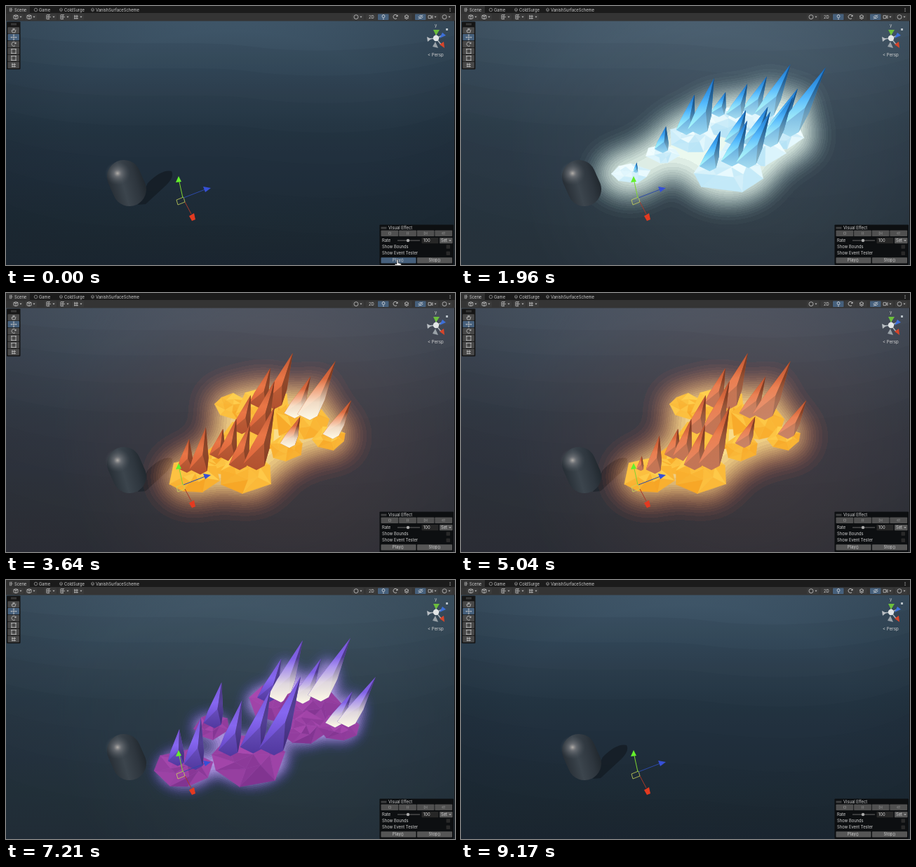
An HTML page that plays this animation: 640x370 px, repeating every 9310 ms.

```html
<!DOCTYPE html>
<html lang="en">
<head>
<meta charset="utf-8">
<title>Crystal eruption</title>
<style>
html, body { margin: 0; width: 100%; height: 100%; overflow: hidden; background: #25323d; }
svg { display: block; width: 640px; height: 370px; }
text { font: 5.8px Inter, "Open Sans", sans-serif; fill: #d2d2d2; }
</style>
</head>
<body>
<svg id="stage" viewBox="0 0 640 370">
  <defs>
    <linearGradient id="ground" x2="0" y2="1">
      <stop offset="0" stop-color="#40576a"/><stop offset=".18" stop-color="#364b5c"/>
      <stop offset=".42" stop-color="#2b3c4a"/><stop offset=".7" stop-color="#25333e"/>
      <stop offset="1" stop-color="#222d36"/>
    </linearGradient>
    <radialGradient id="vignette" cx=".5" cy=".4" r=".65">
      <stop offset=".55" stop-color="#18232d" stop-opacity="0"/><stop offset="1" stop-color="#18232d" stop-opacity=".3"/>
    </radialGradient>
    <radialGradient id="fade" gradientUnits="userSpaceOnUse" cx="400" cy="185" r="330">
      <stop offset=".2" stop-color="#fff"/><stop offset="1" stop-color="#777"/>
    </radialGradient>
    <mask id="wash"><rect width="640" height="370" fill="url(#fade)"/></mask>
    <linearGradient id="body" gradientUnits="userSpaceOnUse" x1="147" y1="262" x2="198" y2="248">
      <stop offset="0" stop-color="#262d34"/><stop offset=".4" stop-color="#3c454d"/>
      <stop offset=".75" stop-color="#2e363e"/><stop offset="1" stop-color="#20272d"/>
    </linearGradient>
    <radialGradient id="shine">
      <stop offset="0" stop-color="#c0bab4" stop-opacity=".9"/><stop offset=".3" stop-color="#85868a" stop-opacity=".6"/>
      <stop offset="1" stop-color="#50585f" stop-opacity="0"/>
    </radialGradient>
    <linearGradient id="heat" x2="0" y2="1">
      <stop offset=".3" stop-color="#fffbe8" stop-opacity="0"/><stop offset=".7" stop-color="#fffbe8" stop-opacity=".8"/>
      <stop offset="1" stop-color="#fffbe8"/>
    </linearGradient>
  </defs>

  <rect y="21" width="640" height="349" fill="url(#ground)"/>
  <g id="waves" fill="#17232d" fill-opacity=".07"/>
  <rect y="21" width="640" height="349" fill="url(#vignette)"/>
  <rect id="tint" y="21" width="640" height="349" mask="url(#wash)"/>
  <path id="shadow" d="M188 284L202 253Q222 233 236 236Q241 245 225 259L199 283Z" fill="#141d25"/>
  <g id="glows"></g>
  <path d="M168 244L176 262" stroke="url(#body)" stroke-width="48" stroke-linecap="round"/>
  <ellipse cx="159" cy="239" rx="18" ry="17" fill="url(#shine)"/>
  <g id="crystals"></g>

  <g id="handles" fill="none">
    <path d="M243 277L253 273L255 280L245 284Z" stroke="#c9d65c" stroke-width=".8"/>
    <path d="M252 274L247 251" stroke="#7ed531"/><path d="M242 252L246 243L250 251Z" fill="#64f02c"/>
    <path d="M255 280L264 297" stroke="#a8392a"/><path d="M261 300L268 296L270 305L265 307Z" fill="#e33a20"/>
    <path d="M253 274L284 262" stroke="#2c49a8"/><path d="M281 258L292 260L284 266Z" fill="#3650d6"/>
  </g>

  <g id="compass">
    <path d="M613 46L603 47M613 46L622 42M613 46L620 55M613 46L613 36" stroke="#aab2b8" stroke-width="1.5"/>
    <path d="M609 34L618 34L613 42Z" fill="#6cbf3c"/><path d="M622 38L627 42L618 46Z" fill="#3d6fd8"/>
    <path d="M618 55L624 51L625 60Z" fill="#d6452a"/><path d="M600 44L606 47L601 51Z" fill="#b9bec3"/>
    <path d="M608 58L612 51L616 60Z" fill="#9aa2a8"/>
    <circle cx="613" cy="46" r="4.2" fill="#e2e5e6"/>
    <path d="M627 32h3v3h-3z" fill="#b7c0c7"/>
    <text x="611" y="30">y</text>
    <text x="601" y="72" style="font-size:6.2px">&lt; Persp</text>
  </g>
  <g id="ui"></g>
  <g id="panel"></g>
  <path id="cursor" d="M-1 0Q0 -2 1 0V4L5 5Q6 8 4 11H-1L-4 6L-2 5L-1 6Z" fill="#fff" stroke="#111" stroke-width=".6"/>
</svg>
<script>
const $ = id => document.getElementById(id);
const LOOP = 9310, STEP = 70;

function add(parent, tag, attrs = {}, label) {
  const node = document.createElementNS('http://www.w3.org/2000/svg', tag);
  for (const key in attrs) node.setAttribute(key, attrs[key]);
  if (label) node.textContent = label;
  return parent.appendChild(node);
}
const clamp = v => Math.max(0, Math.min(1, v));
const ramp = (t, a, b) => clamp((t - a) / (b - a));
const lerp = (a, b, k) => a + (b - a) * k;
const mix = (p, q, k) => p.map((v, i) => lerp(v, q[i], k));
const rgb = c => `rgb(${c.map(v => Math.min(255, Math.round(v)))})`;
const poly = points => 'M' + points.map(p => p.map(v => v.toFixed(1))).join('L') + 'Z';
const easeOutBack = k => 1 + 2.2 * (k - 1) ** 3 + 1.2 * (k - 1) ** 2;

let seed = 7;
const random = () => (seed = seed * 16807 % 2147483647) / 2147483647;
const jitter = amount => (random() - .5) * amount;

// Each cluster is x, y, rock radius, spike height; everything else follows from rules.
const effects = [
  { start: 0, blur: 17, spread: 20, flat: .58, shade: 0, tint: '#7a8690', tintAlpha: .26,
    rock: [[240, 253, 255], [180, 226, 246]], spike: [[20, 92, 165], [62, 152, 220], [130, 212, 252]],
    peak: [.9, .97, .91], gamma: [1.3, 1.2, 1.2],
    clusters: [[422, 158, 34, 72], [378, 165, 38, 45], [455, 187, 34, 92], [330, 188, 34, 75], [412, 203, 46, 66],
      [287, 212, 22, 36], [381, 236, 50, 75], [241, 239, 30, 50]] },
  { start: 3080, blur: 20, spread: 12, flat: .76, shade: .65, tint: '#7a5450', tintAlpha: .36,
    rock: [[255, 207, 78], [246, 160, 32]], spike: [[156, 70, 42], [194, 98, 58], [184, 84, 48]],
    peak: [.97, .82, .38], gamma: [1, 1.5, 1.7],
    clusters: [[322, 163, 23, 0], [368, 166, 40, 74], [420, 184, 36, 78], [345, 205, 38, 72], [461, 207, 22, 50],
      [400, 222, 26, 40], [308, 238, 30, 55], [343, 256, 38, 85], [267, 262, 34, 62]] },
  { start: 6440, blur: 11, spread: 4, flat: .68, shade: 0, tint: '#4a5a62', tintAlpha: .3,
    rock: [[168, 72, 174], [126, 50, 142]], spike: [[98, 72, 176], [112, 86, 200], [84, 58, 164]],
    peak: [.72, .54, .93], gamma: [1.9, 2.1, 1.4],
    clusters: [[380, 175, 38, 82], [434, 178, 42, 84], [292, 210, 26, 60], [425, 212, 35, 0], [476, 212, 28, 66],
      [348, 256, 54, 105], [255, 270, 40, 68]] }
];
const lights = [[418, 206, 58], [346, 174, 46], [323, 234, 44]];

function makeRock(parent, rx, ry, [light, dark]) {
  const count = 7, turn = random() * 6;
  const ring = (radius, dy) => Array.from({ length: count }, (_, i) => {
    const a = turn + (i + random() * .5) / count * Math.PI * 2, r = radius * (.9 + random() * .25);
    return [Math.cos(a) * rx * r, Math.sin(a) * ry * r + dy];
  });
  const outer = ring(1, 0), inner = ring(.5, -ry * .15), center = [rx * .08, -ry * .2];
  const facet = (...points) => {
    const y = points.reduce((sum, p) => sum + p[1], 0) / 3;
    const color = rgb(mix(light, dark, clamp(.4 + y / ry * .35 + jitter(.7))));
    add(parent, 'path', { d: poly(points), fill: color, stroke: color, 'stroke-width': .5 });
  };
  outer.forEach((p, i) => {
    const j = (i + 1) % count;
    facet(p, outer[j], inner[i]);
    facet(inner[i], inner[j], outer[j]);
    facet(inner[i], inner[j], center);
  });
}

function makeSpike(parent, tip, w, name) {
  const left = [-w / 2, -w * .08], right = [w / 2, w * .02], foot = [w * .12, w * .22];
  const bulge = (p, dx) => { const q = mix(p, tip, .3); return [q[0] + dx, q[1]]; };
  const l = bulge(left, -w * .06), r = bulge(right, w * .1), ridge = mix(foot, tip, .42);
  const shape = (points, fill) => add(parent, 'path', { d: poly(points), fill });
  shape([left, l, tip, r, right, foot], `url(#${name}1)`);
  shape([left, l, tip, ridge], `url(#${name}0)`);
  shape([ridge, tip, r, right], `url(#${name}2)`);
  return shape([left, l, tip, r, right, foot], 'url(#heat)');
}

function makePaint(fx, n) {
  const defs = document.querySelector('defs');
  const filter = add(defs, 'filter', { id: 'bloom' + n, filterUnits: 'userSpaceOnUse', x: 0, y: 21, width: 640, height: 349,
    'color-interpolation-filters': 'sRGB' });
  fx.blurNode = add(filter, 'feGaussianBlur', { stdDeviation: fx.blur });
  add(filter, 'feColorMatrix', { values: '0 0 0 1 0  0 0 0 1 0  0 0 0 1 0  0 0 0 0 1' });
  const transfer = add(filter, 'feComponentTransfer'), levels = 20;
  [...'RGB'].forEach((channel, c) => {
    const values = Array.from({ length: levels }, (_, i) => (fx.peak[c] * (i / (levels - 1)) ** fx.gamma[c]).toFixed(3));
    add(transfer, 'feFunc' + channel, { type: 'discrete', tableValues: values.join(' ') });
  });
  [1.2, .97, .74].forEach((gain, i) => {
    const gradient = add(defs, 'linearGradient', { id: `spike${n}-${i}`, x2: 0, y2: 1 });
    fx.spike.forEach((c, s) => add(gradient, 'stop', { offset: s / 2, 'stop-color': rgb(c.map(v => v * gain)) }));
  });
}

function buildEffect(fx, n) {
  makePaint(fx, n);
  fx.glowNode = add($('glows'), 'g', { filter: `url(#bloom${n})`, style: 'mix-blend-mode:screen' });
  fx.node = add($('crystals'), 'g');
  fx.parts = [];
  const spot = (cx, cy, rx, ry) => add(fx.glowNode, 'ellipse', { cx, cy, rx, ry });
  fx.lamps = lights.flatMap(([x, y, size]) => [[1, .9], [1.7, .25]].map(([grow, power]) =>
    ({ node: spot(x, y, size * grow, size * grow * .52), power: power * (size / 58) ** 1.7 })));

  fx.clusters.sort((a, b) => a[1] - b[1]).forEach(([x, y, radius, height]) => {
    const ry = radius * fx.flat, rock = add(fx.node, 'g');
    makeRock(rock, radius, ry, fx.rock);
    fx.parts.push({ node: rock, x, y, lag: 150, halo: spot(x, y, radius + fx.spread, ry + fx.spread) });
    const count = height ? Math.round(radius / 18) : 0;
    for (let i = 0; i < count; i++) {
      const side = i - (count - 1) / 2;
      const bx = x + side * radius * .55 + jitter(5), by = y - ry * .3 + jitter(8);
      const h = height * (i < count - 1 ? .7 + i * .1 : 1);
      const lean = h * (.1 + (bx - 240) / 460), width = 13 + h * .2, hot = bx > 385;
      const node = add(fx.node, 'g'), heat = makeSpike(node, [lean, -h], width, `spike${n}-`);
      const halo = hot && spot(bx + lean * .3, by - h * .3, width * .6, h * .4);
      fx.parts.push({ node, x: bx, y: by, lag: 0, heat, hot, halo });
    }
  });
}

function drawEffect(fx, t) {
  const u = t - fx.start, active = u > 0 && u < 2800;
  fx.node.style.display = fx.glowNode.style.display = active ? '' : 'none';
  if (!active) return 0;
  fx.blurNode.setAttribute('stdDeviation', lerp(fx.blur, 20, ramp(u, 1500, 2300)));
  fx.parts.forEach(part => {
    const born = 60 + (part.x - 230) * 1.3 + (part.lag ? 0 : 20);
    const dying = 1960 + (part.x - 300) * (part.x < 300 ? 4 : 1.2) + part.lag;
    const growth = ramp(u, born, born + 130), decay = ramp(u, dying, dying + 240);
    const scale = growth ? easeOutBack(growth) * (1 - decay * decay) : 0;
    part.node.setAttribute('transform', `translate(${part.x} ${part.y}) scale(${Math.max(0, scale)})`);
    if (part.heat) {
      const early = part.hot ? 1 - .7 * ramp(u, 800, 1300) : .5 * (1 - ramp(u, born, born + 200));
      part.heat.setAttribute('opacity', Math.max(early, ramp(u, 1700, 2300) * .5));
    }
    if (part.halo) part.halo.setAttribute('opacity', growth * (1 - ramp(u, 2150, 2560)) * .95);
  });
  const lamp = ramp(u, 1900, 2350) * (1 - ramp(u, 2570, 2720));
  fx.lamps.forEach(({ node, power }) => node.setAttribute('opacity', lamp * power));
  return ramp(u, 60, 400) * (1 - ramp(u, 2050, 2500));
}

for (let i = 0; i < 7; i++) {
  const y = 52 + i * 34 + i * i * 1.5, dip = 10 + i * 3;
  add($('waves'), 'path', { d: `M0 ${y - dip}C140 ${y + dip} 260 ${y - 6} 350 ${y + 6}S560 ${y + dip} 640 ${y - dip}V370H0Z` });
}

const box = (parent, x, y, width, height, fill) => add(parent, 'rect', { x, y, width, height, fill, rx: .8 });
const say = (parent, x, y, label, more) => add(parent, 'text', { x, y, ...more }, label);
const icon = (parent, x, y, d, more) => add(parent, 'path', { d, transform: `translate(${x} ${y})`, fill: 'none',
  stroke: '#c4c4c4', 'stroke-width': .8, ...more });
const arrow = (parent, x, y) => icon(parent, x, y, 'M-1.6 -.8H1.6L0 1.2Z', { fill: '#bbb', stroke: 'none' });

const glyph = {
  cube: 'M-3 -2L0 -3L3 -2V2L0 3L-3 2ZM-3 -2L0 -1L3 -2M0 -1V3',
  grid: 'M-3 -3H2M-3 0H3M-3 3H1M-3 -3V3M0 -3V3',
  disc: 'M-3 0A3 3 0 1 1 3 0A3 3 0 1 1 -3 0',
  bulb: 'M-1 3H1M-1 1Q-3 -1 -1 -3H1Q3 -1 1 1Z',
  layers: 'M-3 -1L0 -3L3 -1L0 1ZM-3 1L0 3L3 1',
  eye: 'M-3 0Q0 -4 3 0Q0 4 -3 0M-3 3L3 -3',
  camera: 'M-3 -2H1V2H-3ZM1 0L3 -2V2Z',
  hand: 'M-2 3L-3 0L-1 0V-3M0 0V-3M1 0V-3M2 3L3 -1M-2 3H2',
  move: 'M-4 0H4M0 -4V4M-1 -3L0 -4L1 -3M-1 3L0 4L1 3M-3 -1L-4 0L-3 1M3 -1L4 0L3 1',
  turn: 'M3 -1A3 3 0 1 0 2 2M3 -3V-1H1',
  frame: 'M-3 -3H3V3H-3ZM-4 -3H-2M2 -3H4M-4 3H-2M2 3H4',
  all: 'M-3 -1H3M-3 2H3M-2 -3V3M1 -3V3'
};

function buildToolbars() {
  const ui = $('ui');
  add(ui, 'rect', { width: 640, height: 11, fill: '#1b1b1b' });
  add(ui, 'rect', { y: 10, width: 640, height: 11.5, fill: '#343434' });
  add(ui, 'rect', { width: 34, height: 11, fill: '#303030' });
  const tabs = { Scene: ['grid', 12], Game: ['disc', 47], ColdSurge: ['layers', 83], VanishSurfaceScheme: ['layers', 128] };
  for (const label in tabs) {
    const [name, x] = tabs[label];
    say(ui, x, 7.6, label);
    icon(ui, 0, 0, glyph[name], { transform: `translate(${x - 4.5} 5.5) scale(.75)` });
  }
  icon(ui, 633, 5.5, 'M0 -2.5v1M0 -.5v1M0 1.5v1', { 'stroke-width': 1.1 });

  const menus = { 14: 'cube', 33: 'cube', 61: 'grid', 81: 'grid', 100: 'all', 499: 'disc', 605: 'camera', 625: 'disc' };
  for (const x in menus) {
    box(ui, x - 6, 11.5, 17, 8.5, '#3a3a3a');
    icon(ui, x, 15.7, glyph[menus[x]]);
    arrow(ui, +x + 7, 15.5);
  }
  const toggles = { 521: null, 538: 'bulb', 555: 'turn', 571: 'layers', 591: 'eye' };
  for (const x in toggles) {
    const name = toggles[x], on = name === 'bulb' || name === 'eye';
    box(ui, x - 8, 11.5, 15.5, 8.5, on ? '#46607c' : '#3a3a3a');
    if (name) icon(ui, x, 15.7, glyph[name], { stroke: '#dedede' });
  }
  say(ui, 517, 17.8, '2D');

  box(ui, 1, 22.5, 19.5, 68, '#151515');
  icon(ui, 11, 26, 'M-4 -.7H4M-4 .9H4', { stroke: '#555' });
  ['hand', 'move', 'turn', 'frame', 'frame', 'all'].forEach((name, i) => {
    const y = 30.2 + i * 9.9;
    box(ui, 2.5, y, 16.5, 9.2, i === 1 ? '#46607c' : '#484848');
    icon(ui, 11, y + 4.7, glyph[name]);
  });
  add(ui, 'path', { d: 'M639.5 21V370', stroke: '#1a1a1a' });
}

function buildPanel() {
  const panel = $('panel'), gray = '#565656', middle = { 'text-anchor': 'middle' };
  box(panel, 532.5, 312.5, 105.5, 57.5, '#0d0f11');
  icon(panel, 538.5, 317, 'M-4 -.8H4M-4 .9H4', { stroke: '#6b6b6b' });
  say(panel, 545, 319, 'Visual Effect', { fill: '#c4c4c4' });
  ['M-1.5 -1.5H1.5V1.5H-1.5Z', 'M-1 -2V2M1 -2V2', 'M-2 -2L1 0L-2 2ZM2 -2V2', 'M-2 1V-1H2L1 -2M2 1H-2'].forEach((d, i) => {
    box(panel, 534.5 + i * 25.6, 320.5, 24.8, 8.5, '#505050');
    icon(panel, 547 + i * 25.6, 324.7, d, { stroke: '#858585' });
  });
  say(panel, 536, 337, 'Rate');
  add(panel, 'path', { d: 'M558 335H590', stroke: '#686868' });
  add(panel, 'circle', { cx: 573, cy: 335, r: 2.2, fill: '#aaa' });
  box(panel, 592.5, 331, 24, 8.3, '#272727');
  say(panel, 595, 337.2, '100');
  box(panel, 618, 331, 18.5, 8.3, gray);
  say(panel, 620, 337.2, 'Set');
  arrow(panel, 633, 335);
  ['Show Bounds', 'Show Event Tester'].forEach((label, i) => {
    say(panel, 536, 346 + i * 9.3, label);
    box(panel, 627.5, 341.2 + i * 9.3, 5.5, 5.5, '#292929');
  });
  const [play] = ['Play()', 'Stop()'].map((label, i) => {
    const button = box(panel, 534.5 + i * 51.5, 359.3, 50, 8.3, gray);
    say(panel, 559 + i * 52, 365.4, label, middle);
    return button;
  });
  return play;
}

effects.forEach(buildEffect);
buildToolbars();
const playButton = buildPanel();

// The pointer rises from below the edge, presses when an effect starts, and leaves.
function drawPointer(t) {
  const starts = effects.map(fx => fx.start);
  const press = starts.find(start => t >= start - 420 && t < start + 280);
  const visible = press !== undefined, since = t - press;
  $('cursor').style.display = visible ? '' : 'none';
  playButton.setAttribute('fill', !visible ? '#565656' : since >= 0 && since < 140 ? '#46607c' : '#5a6874');
  if (!visible) return;
  const away = Math.max(1 - ramp(since, -420, -280), ramp(since, 140, 280));
  $('cursor').setAttribute('transform', `translate(558 ${363 + away * 10})`);
}

function draw(t) {
  let shadow = 1, tint = 0;
  effects.forEach(fx => {
    const level = drawEffect(fx, t);
    if (!level) return;
    shadow = lerp(1, fx.shade, level);
    tint = level * fx.tintAlpha;
    $('tint').setAttribute('fill', fx.tint);
  });
  $('tint').setAttribute('opacity', tint);
  $('shadow').setAttribute('opacity', shadow * .85);
  drawPointer(t);
}

const begin = performance.now();
function frame() {
  const t = (performance.now() - begin) % LOOP;
  draw(Math.floor(t / STEP) * STEP);
  requestAnimationFrame(frame);
}
frame();
</script>
</body>
</html>
```
